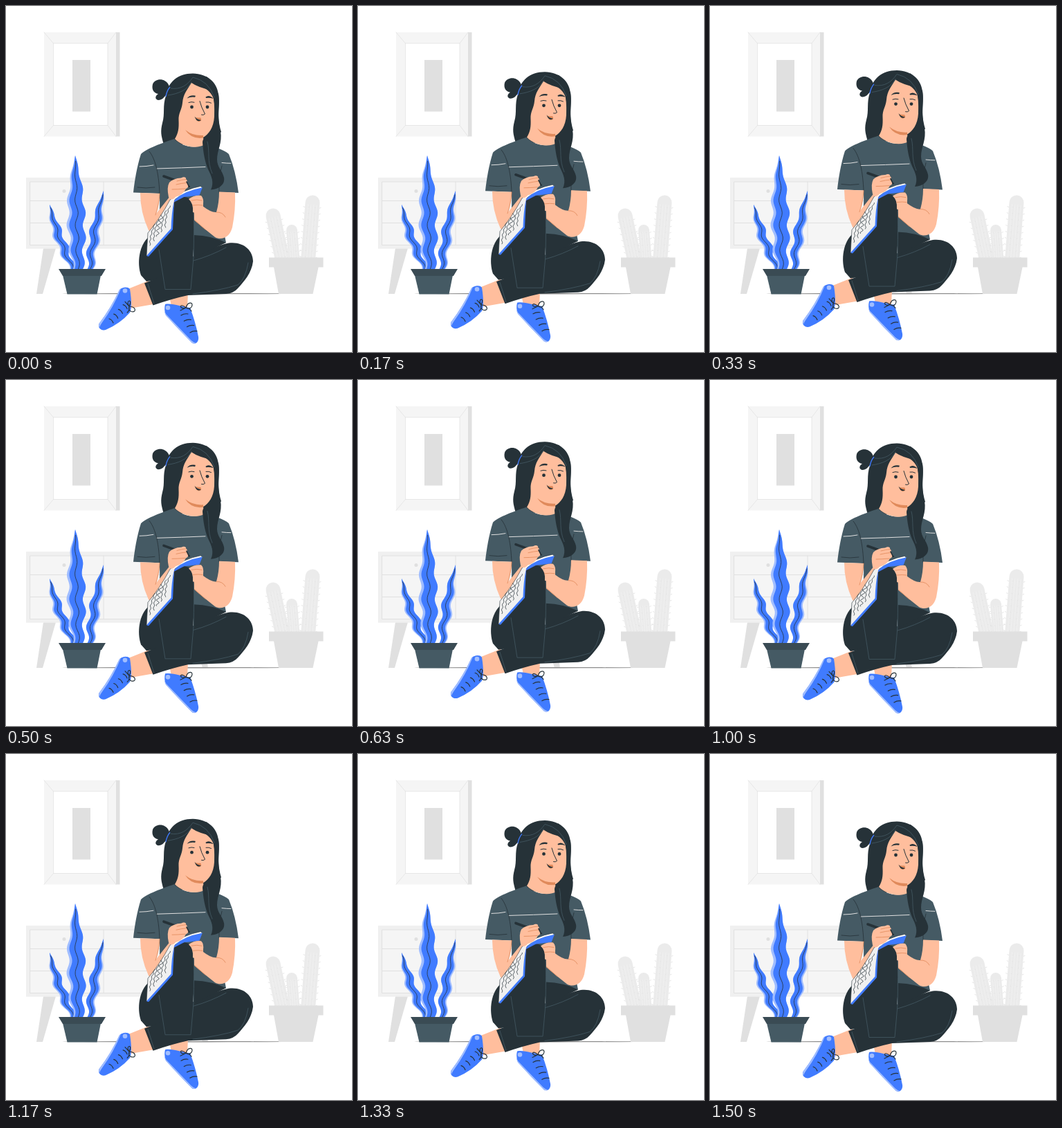
Animation, 500 px wide and 500 px high, one loop 1.54 s. Source, as an HTML page:

```html
<!DOCTYPE html>
<html lang="en">
<head>
<meta charset="utf-8">
<title>Writing in a notebook</title>
<style>
html, body { margin: 0; width: 100%; height: 100%; overflow: hidden; background: #fff; }
svg { display: block; width: 100vw; height: 100vh; }
.line, .seam, .fold, .rule { fill: none; stroke: #263238; stroke-linecap: round; stroke-linejoin: round; }
.seam { stroke: #455a64; stroke-width: .8; }
.fold { stroke: #e08a5b; stroke-width: .8; }
.rule { stroke: #e0e0e0; }
.dark { fill: #263238; }
.skin { fill: #ffbe9d; }
.blue { fill: #407bff; }
.pale { fill: #a0bdff; }
.grey { fill: #e0e0e0; }
</style>
</head>
<body>
<svg viewBox="0 0 500 500">
  <g id="room">
    <path class="grey" d="M158 38h6.500v150.500h-6.500z"/>
    <path fill="#f5f5f5" d="M55 38h104v150.500H55z"/>
    <path fill="#fff" d="M68.500 54H147v118.500H68.500z"/>
    <path class="rule" stroke-width=".7" d="M55 38l13.500 16H147l12-16M55 188.500l13.500-16H147l12 16M68.500 54v118.500M147 54v118.500"/>
    <path class="grey" d="M96 78h26v74.500H96z"/>

    <path class="grey" d="M54 350h18l-19 66h-9zM264 350h18l10 66h-8z"/>
    <path fill="#f5f5f5" d="M29 248h278v102.500H29z"/>
    <path fill="#f0f0f0" d="M29 248h278v6H35v91.500h272v5H29z"/>
    <path class="rule" d="M35 254h266v91.500H35zM35 281.500h266M35 313.500h266M141 254v91.500"/>
    <circle class="grey" cx="84" cy="267.500" r="2.500"/>
    <ellipse cx="255" cy="415.700" rx="174" ry=".7" fill="#8c8c8c"/>
  </g>

  <g id="cactus"></g>
  <path class="grey" d="M380 363.500h78.500v14H380zM387 377.500h64.500l-8 38.500h-49.500z"/>

  <g id="plant"></g>
  <path fill="#455a64" d="M82 389h55l-5.500 27.500h-43z"/>
  <path fill="#3a4b54" d="M76 380h68l-6 10H82z"/>

  <g id="girl">
    <!-- hair behind the shoulders -->
    <path class="dark" d="M231 130C234 110 248 97.500 270 97.500C291 98 305 110 307 128C309 146 304 158 311 182L290 200H228C224 187 223 181 226 169C230 156 226 144 231 130z"/>
    <path class="dark" d="M235 114C230 104 216 104 212 113C210 121 214 126 220 127C215 130 215 135 220 136C226 136 228 132 231 129C237 126 238 119 235 114z"/>
    <path fill="none" stroke="#407bff" stroke-width="1.300" d="M237 117q-5 6-6 14"/>

    <!-- shirt -->
    <path fill="#455a64" d="M243 192C226 198 203 206 195 214C189 233 186 252 184 269.500L222 271Q223 300 219 342H318Q309 300 308 269L336 270Q332 238 322 214C316 208 300 203 286 199C275 207 255 204 243 192z"/>
    <path class="rule" d="M193 232q10 0 20-2M218 235q36-1 70-2.500M312 226.500q7 .8 13 .8"/>
    <path class="line" stroke-width=".8" d="M207 210C217 222 221 246 222 271M308 269q-1-20 4-38M190 262q12 2 25 0"/>

    <!-- head -->
    <path class="skin" d="M268 111C262 121 256 127 255 140C254 150 249 155 249.500 165C250 177 249 184 244 192C255 204 277 207 287 200L285 190C293 185 300 176 301 160Q302 138 298 122Q278 118 268 111z"/>
    <path fill="#e08a5b" d="M259 179Q270 188 285 187v3.500Q268 193 259 179z"/>
    <path class="dark" d="M268 110C282 115 296 121 300 134C303 151 302 170 297 182C290 188 284 191 284 197C285 211 287 224 292 236C297 246 301 255 296 265.500C307 265 317 258 315 248C313 238 305 233 305 222C305 208 313 198 310 181C304 158 310 144 307 127L290 102z"/>
    <path class="seam" d="M234 129C248 127 262 122 268 110M238 119C252 121 262 115 270 103Q293 108 301 132M291 196C295 211 290 224 298 242"/>
    <g class="dark">
      <circle cx="268.500" cy="146" r="2.400"/><circle cx="291" cy="146" r="2.400"/>
      <path d="M261.500 133.500q4-5.500 12-4q.7 1.500-.5 2.300q-6-1-11.500 1.700zM288.500 131.500q5-4 11.500 2.500q-6-2-11-1z"/>
    </g>
    <path class="line" stroke-width="1" d="M264 139.500q4-1.600 8-.3M289 139q4-.7 7.500 1.200M280 137.500Q282 146 287.500 156q-2 2.200-5 1.200"/>
    <path fill="#e08a5b" d="M273.500 161q3 9 8.500 4.500q.5-5-3-4z"/>
    <path class="dark" d="M272.500 159.500q3 4.500 9.500 5.500q-6.500 4-9.500-5.500z"/>

    <!-- arms -->
    <path class="skin" d="M194 270l28 1Q222 285 217 300L237 275l13 8-37 47-7-6Q194 298 194 270z"/>
    <path class="skin" d="M308 268.500l23 1Q332 295 327 320C323 335 311 339 302 334Q284 320 269 307l-1-23 16 5Q297 299 304 298Q308 284 308 268.500z"/>
    <path class="fold" d="M222 271q-1 17-6 31M304 298q9-.5 13 7M270 307q10 9 18 16"/>

    <!-- legs -->
    <path class="skin" d="M206 397l-30 12q5 14 3 28l34-6zM235 414h28l-1 23-23-3z"/>
    <g class="dark">
      <path d="M207 333C192 345 189 372 195 389l8 9 29-4 30-64-23-10z"/>
      <path d="M240 376l30-14C290 355 304 346 322 342.500C343 340 357 353 357 369C355 386 344 398 335 408Q329 415 318 416L263 418Q240 423 212.500 432.500L200 400.500Q224 393 240 376z"/>
      <path d="M243 282C248 273 268 273 271 287Q273 320 270.500 361L267 409.500H230L221 350l18-26z"/>
      <path d="M271 331Q298 332 318 342l-47 22z"/>
    </g>
    <path class="seam" d="M221 352l9 57.500h37l4-46.500Q272 320 271 288M271 368Q296 361 318 349M270 416Q310 411 335 403Q346 395 350 371M205 401.500l9 28.500"/>

    <!-- shoes -->
    <path class="blue" d="M179 409C176 405 168 406 164 410Q152 436 134.500 459C132 465 138 470 144 468Q165 459 179 443Q183 434 179 409z"/>
    <path class="pale" d="M164 410Q152 436 134.500 459q-1 3 .5 5.500q1-3 3.500-6.500Q156 434 166 408.500z"/>
    <path class="blue" d="M230 431q-2 8 1 16 18 20 38 40C275 490 279 484 278 478Q274 457 266 436C255 435 240 429 230 431z"/>
    <path class="pale" d="M229 440q0 4 2 7 18 20 38 40 3 1.500 5.500 0-4-1-7-4L231 445z"/>
    <circle class="pale" cx="172" cy="411.500" r="3.300"/>
    <circle class="pale" cx="234" cy="436" r="3.300"/>
    <g id="laces"></g>

    <!-- notebook -->
    <path class="blue" d="M283 262.500Q258 266 243 281l-2 42-35 39-3-1 37-76z"/>
    <path class="blue" d="M284 262l-4.500 11.500Q266 275 247 277z"/>
    <path fill="#f0f0f0" d="M203 361l2-33Q222 308 237 280L243 280Q239 300 238.500 321.500z"/>
    <path fill="#fff" d="M237 280Q257 265 281 260.500l2 2Q258 267 243 280z"/>
    <path class="line" stroke-width=".6" d="M203 361l2-33Q222 308 237 280Q257 265 281 260.500"/>
    <g id="notes"></g>

    <!-- hands and pen -->
    <path class="skin" d="M264 279Q272 273 282 274Q286 278 285 286Q286 298 277 300l-7-2Q271 285 264 279z"/>
    <path class="line" stroke-width="3.600" d="M228 246l18 6.500"/>
    <path class="line" stroke-width="2" d="M244 252l21 9"/>
    <path class="skin" d="M235 276Q232 262 236 255Q242 249 253 248.500C258 246 261 248 260 250.500q3 1.500 1 4.500C265 258 264 263 260 264Q257 272 245 276C242 280 237 281 235 276z"/>
    <path class="fold" d="M247 253q7-2 13-2.500M246 258q8-2 15-2.500M240 265q8 0 19-1M268 281q8-2 15 0M270 288q8-1 14 0"/>
    <path class="line" stroke-width="1.600" d="M261 254l3.500 7"/>
  </g>
</svg>
<script>
const $ = id => document.getElementById(id);
const { sin, abs, PI, floor, hypot } = Math;
const LOOP = 1540, FRAME = 1000 / 24;
const PERIOD = 1500, HEIGHT = 10, DELAY = 25;

function add(parent, attrs) {
  const el = document.createElementNS('http://www.w3.org/2000/svg', 'path');
  for (const key in attrs) el.setAttribute(key, attrs[key]);
  parent.appendChild(el);
}

// Path through the points f(0) to f(1)
function trace(f, n = 40) {
  const pts = Array.from({ length: n + 1 }, (_, i) => f(i / n));
  return 'M' + pts.join('L');
}

// Tapering ribbon that sways from its base up to its tip
function leaf(base, tip, half, bend, waves, side) {
  const dx = tip[0] - base[0], dy = tip[1] - base[1];
  const width = u => half * (.35 + .65 * sin(PI * Math.min(1, u * 1.25 + .1) / 2)) * (1 - u ** 4) * (1 - .3 * u);
  const at = (u, s) => [
    base[0] + dx * u + bend * sin(PI * u) + 2.6 * sin(2 * PI * waves * u) * (1 - u ** 3) + s * width(u),
    base[1] + dy * u
  ];
  const shape = (l, r) => trace(u => u < .5 ? at(2 * u, -l) : at(2 - 2 * u, r), 120) + 'z';
  const g = $('plant');
  add(g, { d: shape(side < 0 ? 1.15 : 1, side > 0 ? 1.15 : 1), class: 'pale' });
  add(g, { d: shape(side < 0 ? .8 : 1, side > 0 ? .8 : 1), class: 'blue' });
  add(g, { d: trace(u => at(u * .95, 0)), class: 'line', 'stroke-width': .8 });
}
leaf([97, 381], [63, 287], 8.5, -3, 3.5, -1);
leaf([121, 381], [141, 267], 8.5, -2, 3.5, 1);
leaf([104, 381], [100, 216], 14.5, 0, 4.5, -1);

// Rounded, slightly leaning stem with ribs and spines
function stem(x0, y0, x1, y1, w) {
  const g = $('cactus'), dx = x1 - x0, dy = y1 - y0, len = hypot(dx, dy), r = w / 2;
  const at = (u, s) => [x0 + dx * u - dy / len * r * s, y0 + dy * u + dx / len * r * s];
  add(g, { d: `M${at(0, 0)}L${at(1, 0)}`, stroke: '#ebebeb', 'stroke-width': w, 'stroke-linecap': 'round' });
  let ribs = '', spines = '';
  for (let s = -.6; s < 1; s += .4) ribs += `M${at(0, s)}L${at(.97, s)}`;
  for (let u = .02; u < 1; u += 9 / len)
    for (const s of [-1, -.4, .4, 1]) spines += `M${at(u, s)}l${s * 2.5} -1`;
  add(g, { d: ribs, stroke: '#f2f2f2', 'stroke-width': .7 });
  add(g, { d: spines, stroke: '#dcdcdc', 'stroke-width': .7 });
}
stem(436, 374, 443, 284, 21);
stem(401, 374, 386, 303, 21);
stem(417, 374, 413, 324, 16);

// Four laces and a bow on each shoe
function laces(x, y, dx, dy, curl, bow, turn) {
  let d = '';
  for (let i = 0; i < 4; i++) d += `M${x + dx * i} ${y + dy * i}${curl}`;
  const style = { class: 'line', 'stroke-width': 1.2 };
  add($('laces'), { d, ...style });
  add($('laces'), {
    d: 'M0 0C-10-9-10 4 0 0C3-10 12-8 8-1Q5 3 0 0M0 0l-8 4M0 0q6 1 8 5',
    transform: `translate(${bow}) rotate(${turn})`, ...style
  });
}
laces(149, 452, 6.7, -6.8, 'q4 1 6 6', '178 434', 75);
laces(253, 447, 4.3, 8.3, 'q5-3 10-2', '260 436', 0);

// Handwriting along the slanted page
for (let i = 0; i < 5; i++) {
  const x = 208 + i * 5.5, y = 346 - i * 6.5;
  const size = i == 2 ? 2 : .7;
  add($('notes'), {
    d: trace(u => [x + 7 * u * u + size * sin(u * 26 + i * 2), y - 31 * u]),
    class: 'line', 'stroke-width': .8
  });
}

// Steady rise and fall, measured from the resting pose
const height = t => HEIGHT * (1 - abs(2 * ((t + DELAY) / PERIOD % 1) - 1));

function draw(now) {
  const t = floor((now % LOOP + 4) / FRAME) * FRAME;
  $('girl').setAttribute('transform', `translate(0 ${(height(0) - height(t)).toFixed(2)})`);
}

const start = performance.now();
function tick() {
  draw(performance.now() - start);
  requestAnimationFrame(tick);
}
tick();
</script>
</body>
</html>
```
